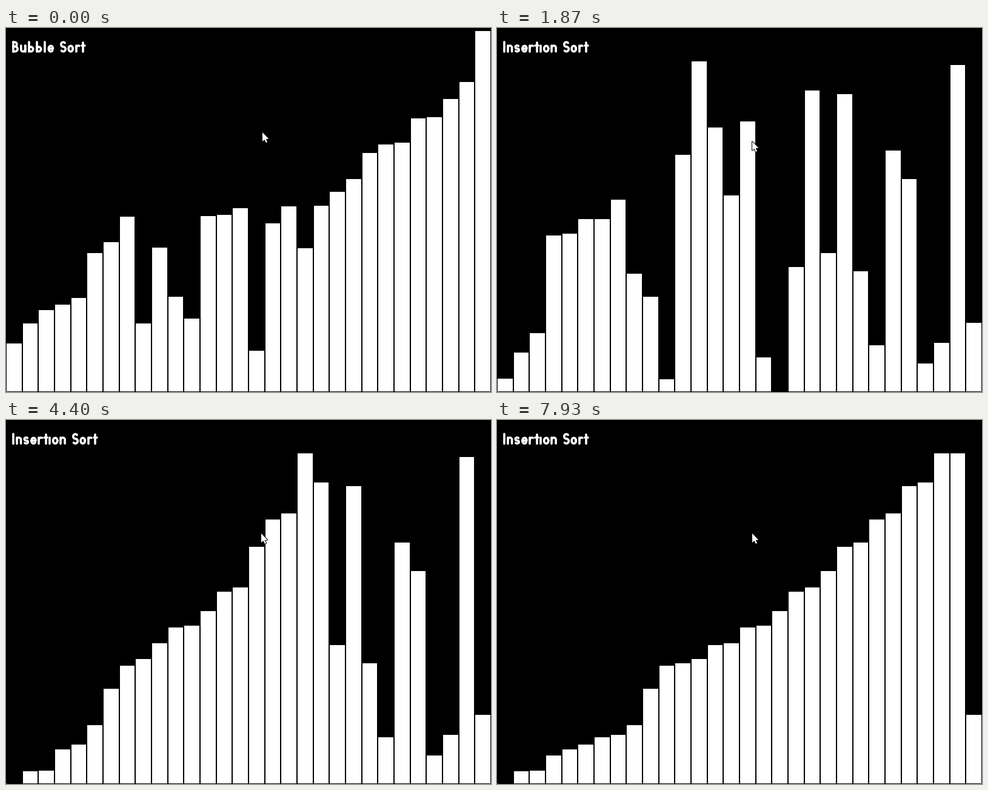
Recreate the animation shown at these times as a matplotlib script. Size 800x600 px, loop 8000 ms.

```python
import numpy as np
import matplotlib.pyplot as plt
from matplotlib.animation import FuncAnimation
from matplotlib.patches import Polygon, Rectangle

W, H, DPI = 800, 600, 100
FRAMES, LOOP = 120, 8000
BARS = 30
OPS_PER_FRAME = 32 / 15   # one sorting step every 31.25 ms
PHASE = 0.9
PX = 72 / DPI

# Bar tops in pixels; a smaller number is a taller bar.
HALF_SORTED = [520, 487, 465, 456, 445, 371, 353, 311, 487, 362,
               443, 479, 310, 308, 297, 532, 322, 294, 363, 293,
               270, 249, 206, 192, 189, 149, 147, 117, 89, 5]
SHUFFLED = [535, 503, 578, 339, 342, 283, 315, 368, 405, 443,
            579, 209, 55, 164, 276, 154, 543, 600, 394, 103,
            371, 109, 401, 523, 202, 249, 553, 519, 61, 486]


def bubble_sort(tops, last, j):
    a = list(tops)
    yield list(a)
    while last > 0:
        for k in range(j, last):
            if a[k] < a[k + 1]:
                a[k], a[k + 1] = a[k + 1], a[k]
                yield list(a)
        j, last = 0, last - 1


def insertion_sort(tops):
    a = list(tops)
    yield list(a)
    for i in range(1, len(a)):
        key, j = a[i], i - 1
        while j >= 0 and a[j] < key:
            a[j + 1] = a[j]
            yield list(a)
            j -= 1
        a[j + 1] = key
        yield list(a)


steps = [("Bubble Sort", a) for a in bubble_sort(HALF_SORTED, 18, 7)]
steps += [("Insertion Sort", a) for a in insertion_sort(SHUFFLED)]


def arc(cx, cy, rx, ry, start, end):
    t = np.radians(np.linspace(start, end, 24))
    return list(zip(cx + rx * np.cos(t), cy + ry * np.sin(t)))


CAP, XH, LOW, L, R = 17.2, 11.5, 1.8, 1.8, 8.6
STEM = [(L, LOW), (L, CAP)]
SHORT = [(L, LOW), (L, XH)]

# letter: (advance, strokes), y measured up from the baseline
GLYPHS = {
    "B": (13, [STEM,
               [(L, CAP)] + arc(4.2, 13.6, 3.6, 3.6, 90, -90) + [(L, 10)],
               [(L, 10)] + arc(4.8, 5.9, 4.3, 4.1, 90, -90) + [(L, LOW)]]),
    "I": (6, [STEM]),
    "S": (12.5, [arc(5.4, 13.4, 3.6, 3.8, 40, 270)
                 + arc(5.4, 5.7, 3.8, 3.9, 90, -140)]),
    "b": (13, [STEM, arc(5.2, 5.6, 3.4, 3.8, 0, 360)]),
    "e": (12.5, [[(2.2, 6.5)] + arc(5.4, 6.4, 3.6, 4.7, 0, 320)]),
    "i": (5.5, [SHORT, [(L, 16.5), (L, 16.6)]]),
    "l": (6.5, [STEM]),
    "n": (12.5, [SHORT, arc(5.2, 8, 3.4, 3.4, 180, 0) + [(R, LOW)]]),
    "o": (12.5, [arc(5.2, 6.4, 3.6, 4.7, 0, 360)]),
    "r": (9, [SHORT, arc(5.2, 8, 3.4, 3.4, 180, 60)]),
    "s": (11.5, [arc(4.7, 9.1, 2.9, 2.5, 40, 270)
                 + arc(4.7, 4.2, 3, 2.4, 90, -140)]),
    "t": (9, [[(4, 16.5), (4, LOW)], [(1.6, 11.3), (6.8, 11.3)]]),
    "u": (13, [[(L, XH)] + arc(5.2, 5.2, 3.4, 3.4, 180, 360) + [(R, XH)],
               [(R, XH), (R, LOW)]]),
    " ": (8, []),
}

fig = plt.figure(figsize=(W / DPI, H / DPI), dpi=DPI, facecolor="black")
ax = fig.add_axes([0, 0, 1, 1])
ax.set_xlim(0, W)
ax.set_ylim(H, 0)
ax.axis("off")


def write(text, x, baseline):
    lines = []
    for ch in text:
        advance, strokes = GLYPHS[ch]
        for pts in strokes:
            xs, ys = np.array(pts).T
            lines += ax.plot(x + xs, baseline - ys, color="white",
                             lw=3.6 * PX, solid_capstyle="round",
                             solid_joinstyle="round")
        x += advance
    return lines


titles = {name: write(name, 10, 40.5)
          for name in ("Bubble Sort", "Insertion Sort")}

edges = [round(i * W / BARS) for i in range(BARS + 1)]
bars = [ax.add_patch(Rectangle((a + 1, 0), b - a - 2, 0, fc="white",
                               lw=0, antialiased=False))
        for a, b in zip(edges, edges[1:])]

# rounded window corners
for x, d in ((0, 1), (W, -1)):
    ax.add_patch(Polygon([(x, H), (x + 2 * d, H), (x, H - 2)],
                         fc="#666666", lw=0))

ARROW = np.array([(0, 0), (0, 15), (3.4, 12), (5.8, 17),
                  (8, 16), (5.8, 11), (10.3, 10.7)])
outline = ax.add_patch(Polygon(ARROW, fc="black", ec="black", lw=2 * PX,
                               joinstyle="miter", zorder=5))
arrow = ax.add_patch(Polygon(ARROW, fc="white", lw=0, zorder=6))


def update(frame):
    op = int(PHASE + frame * OPS_PER_FRAME)
    title, tops = steps[min(op, len(steps) - 1)]
    for name, lines in titles.items():
        for line in lines:
            line.set_visible(name == title)
    for bar, top in zip(bars, tops):
        bar.set_y(top)
        bar.set_height(max(0, H - 1 - top))
    p = min(frame / 6, 1)
    tip = np.round([423 - 2 * p, 172 + 15 * p])
    for part in (outline, arrow):
        part.set_xy(ARROW + tip)
    return bars + [outline, arrow]


anim = FuncAnimation(fig, update, frames=FRAMES, interval=LOOP / FRAMES,
                     repeat=True, repeat_delay=0, blit=False)
plt.show()
```
